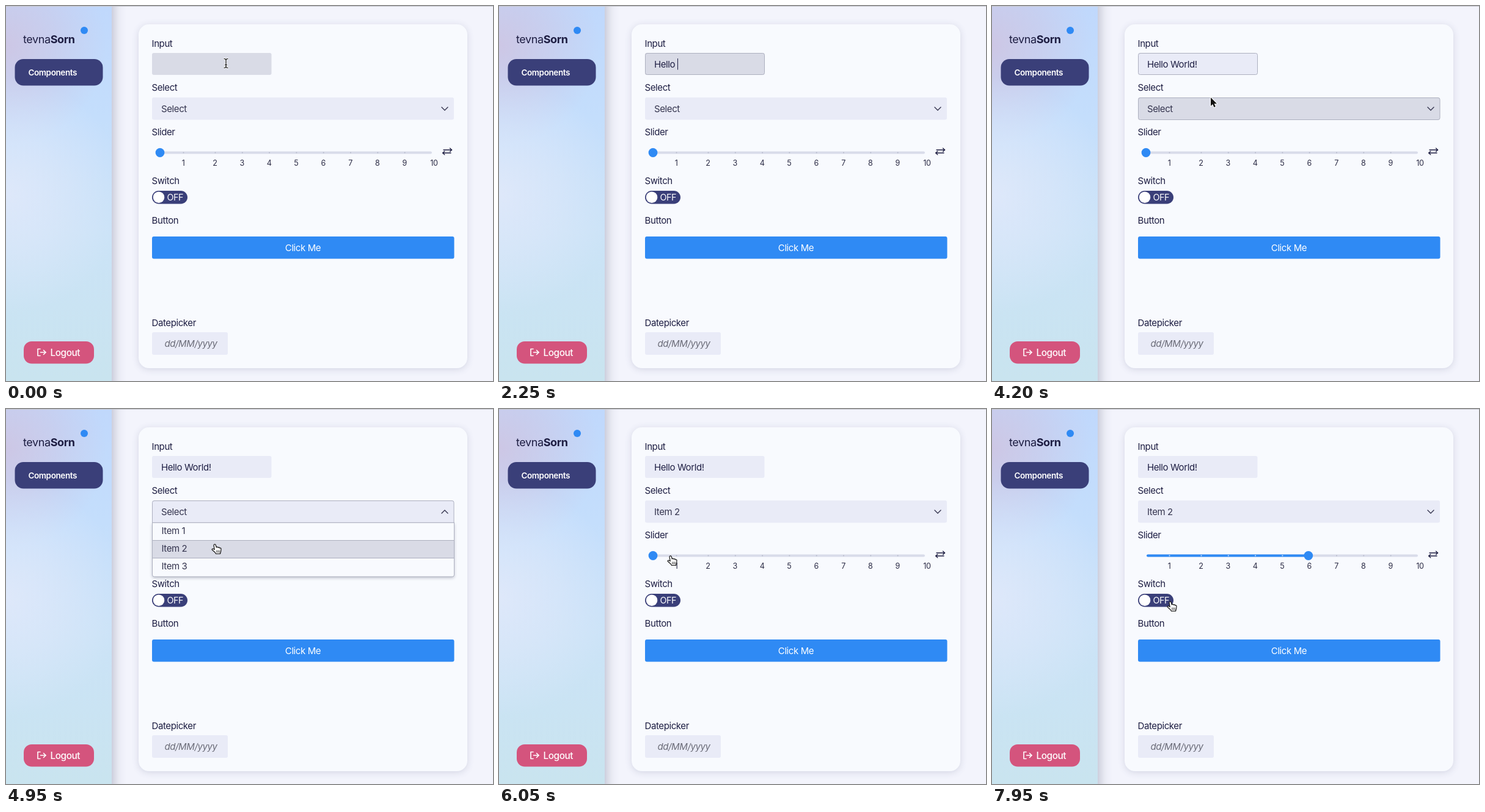
Write an HTML page with a canvas that moves like this. It is 797 px wide and 615 px high and loops after 8000 ms.

```html
<!DOCTYPE html>
<html lang="en">
<head>
<meta charset="utf-8">
<title>Component demo</title>
<style>
html, body { margin: 0; width: 100%; height: 100%; overflow: hidden; background: #f3f4fc; }
canvas { display: block; width: 797px; height: 615px; }
</style>
</head>
<body>
<canvas id="stage"></canvas>
<script>
const W = 797, H = 615, LOOP = 8000, STEP = 50;
const canvas = document.getElementById('stage');
const ctx = canvas.getContext('2d');
const dpr = window.devicePixelRatio || 1;
canvas.width = Math.round(W * dpr);
canvas.height = Math.round(H * dpr);

const INK = '#1d1d42', NAVY = '#3a3f79', BLUE = '#2f8af4', FIELD = '#e9ebf7',
      HOVER = '#d9dbe6', EDGE = '#adb0bf', CARD = '#f8fafe';

const MESSAGE = 'Hello World!';
const KEY_TIMES = [1200, 1400, 1600, 1750, 1950, 2150, 2500, 2650, 2800, 2950, 3050, 3250];
const FOCUS = 600, PRESS = 4150, OPEN = 4250, CHOOSE = 5200, GRAB = 6150;
const WAKE = 3650;

// time, x, y of the pointer's hot spot
const ROUTE = [
  [0, 360, 94], [WAKE, 360, 94], [4050, 358, 150], [4300, 358, 150],
  [4850, 342, 222], [5300, 342, 222], [5900, 281, 241], [GRAB, 281, 241],
  [6700, 509, 244], [7000, 509, 244], [7800, 292, 316], [LOOP, 292, 316]
];

const ARROW = new Path2D('M0 0V14L3.2 11L5.4 16L7.8 15L5.6 10.2H10Z');
const HAND = new Path2D('M-2 1.5C-2-.6.8-.6 1.2 1L2.3 5C3 3.8 5 4 5.2 5.4C6 4.4 7.6 4.8 7.8 6.2' +
  'C8.8 5.4 10 6 10 7.5L9.6 11.5L8.5 15.5H1.5L0 13L-4.6 9C-5.6 7.8-4 6.4-2.6 7.4L-.8 8.6Z');
const KNUCKLES = new Path2D('M2.8 10V13.5M5 10V13.5M7.2 10V13.5');

const ease = p => p * p * (3 - 2 * p);
const within = (p, x, y, w, h) => p.x >= x && p.x <= x + w && p.y >= y && p.y < y + h;

function pointerAt(t) {
  const i = Math.max(1, ROUTE.findIndex(k => k[0] > t));
  const [t0, x0, y0] = ROUTE[i - 1], [t1, x1, y1] = ROUTE[i];
  const p = ease((t - t0) / (t1 - t0));
  return { x: x0 + (x1 - x0) * p, y: y0 + (y1 - y0) * p };
}

function box(x, y, w, h, r, fill, edge) {
  ctx.beginPath();
  ctx.roundRect(x, y, w, h, r);
  if (fill) {
    ctx.fillStyle = fill;
    ctx.fill();
  }
  if (edge) {
    ctx.strokeStyle = edge;
    ctx.lineWidth = 1;
    ctx.stroke();
  }
}

function dot(x, y, r, color) {
  ctx.beginPath();
  ctx.arc(x, y, r, 0, Math.PI * 2);
  ctx.fillStyle = color;
  ctx.fill();
}

function line(color, width, ...points) {
  ctx.beginPath();
  points.forEach(([x, y], i) => i ? ctx.lineTo(x, y) : ctx.moveTo(x, y));
  ctx.strokeStyle = color;
  ctx.lineWidth = width;
  ctx.stroke();
}

function text(str, x, y, { size = 15, weight = 400, color = INK, align = 'left', style = '' } = {}) {
  ctx.font = `${style} ${weight} ${size}px Inter, "Open Sans", sans-serif`;
  ctx.letterSpacing = '-0.4px';
  ctx.textAlign = align;
  ctx.fillStyle = color;
  ctx.fillText(str, x, y);
  return ctx.measureText(str).width;
}

function withShadow(color, blur, dx, dy, draw) {
  ctx.save();
  ctx.shadowColor = color;
  ctx.shadowBlur = blur * dpr;
  ctx.shadowOffsetX = dx * dpr;
  ctx.shadowOffsetY = dy * dpr;
  draw();
  ctx.restore();
}

function glow(x, y, r, rgb) {
  const g = ctx.createRadialGradient(x, y, 0, x, y, r);
  g.addColorStop(0, `rgba(${rgb},1)`);
  g.addColorStop(0.5, `rgba(${rgb},.55)`);
  g.addColorStop(1, `rgba(${rgb},0)`);
  ctx.fillStyle = g;
  ctx.fillRect(0, 0, 173, H);
}

function sidebar() {
  const g = ctx.createLinearGradient(0, 0, 0, H);
  g.addColorStop(0, '#c0d8fc');
  g.addColorStop(0.3, '#c4defc');
  g.addColorStop(0.6, '#cbe3f7');
  g.addColorStop(1, '#c9e4ef');
  withShadow('rgba(70,75,110,.35)', 18, 3, 0, () => box(0, -20, 173, H + 40, 0, '#c9e0f8'));
  ctx.fillStyle = g;
  ctx.fillRect(0, 0, 173, H);
  glow(0, 65, 165, '205,199,229');
  glow(0, 310, 195, '222,232,250');

  const w = text('tevna', 28, 61, { size: 18 });
  text('Sorn', 28 + w, 61, { size: 18, weight: 700 });
  dot(128, 40, 6, BLUE);

  box(14.5, 87, 144, 43.5, 14, NAVY);
  text('Components', 36.5, 113.5, { size: 13.5, weight: 600, color: '#fff' });

  box(29, 550, 115, 36.5, 13, '#d4547d');
  ctx.lineCap = ctx.lineJoin = 'round';
  line('#fff', 1.6, [56, 562.5], [52, 562.5], [52, 573.5], [56, 573.5]);
  line('#fff', 1.6, [56.5, 568], [65, 568]);
  line('#fff', 1.6, [61.5, 564.5], [65, 568], [61.5, 571.5]);
  text('Logout', 72.5, 574, { weight: 500, color: '#fff', size: 15.3 });
}

function inputField(t, mouse) {
  const focused = t >= FOCUS && t < OPEN;
  const hot = within(mouse, 239, 77, 196, 36);
  box(239, 77, 195.5, 36, 3, hot ? HOVER : FIELD);
  if (focused) box(239.5, 77.5, 195, 35, 3, null, EDGE);

  const count = KEY_TIMES.filter(k => k <= t).length;
  const w = text(MESSAGE.slice(0, count), 254, 100.5);
  const lastKey = KEY_TIMES[KEY_TIMES.length - 1];
  const since = t < KEY_TIMES[0] ? t - FOCUS : Math.max(0, t - lastKey);
  if (focused && Math.floor(since / 500) % 2 === 0) {
    ctx.fillStyle = INK;
    ctx.fillRect(Math.round(254 + w), 86, 1, 18.5);
  }
}

function selectField(t, mouse, open) {
  const hot = !open && within(mouse, 239, 149.5, 494, 37);
  const edged = t >= PRESS && t < CHOOSE;
  box(239, 150, 494, 36.5, open ? [3, 3, 0, 0] : 3, hot ? HOVER : FIELD);
  if (edged) box(239.5, 150.5, 493.5, 36, open ? [3, 3, 0, 0] : 3, null, EDGE);
  text(t >= CHOOSE ? 'Item 2' : 'Select', 254, 173.5, { color: '#34344e' });
  const d = open ? -2.5 : 2.5;
  line('#34344e', 1.4, [713, 168.5 - d], [718, 168.5 + d], [723, 168.5 - d]);
}

function slider(mouse, t) {
  const px = t < 6700 ? mouse.x : 509;
  const value = t < GRAB ? 0 : Math.round((px - 252) / 44.3);
  const knob = 252 + value * 44.3;
  box(253, 238.5, 444, 4, 2, '#d9dcea');
  if (value) box(253, 238.5, knob - 253, 4, 2, BLUE);
  for (let n = 1; n <= 10; n++) {
    const x = n === 1 ? 290 : n === 10 ? 700.5 : 253.4 + 44.3 * n;
    if (n < 10) dot(x + 0.5, 240.5, 1, x < knob ? '#cfe3fc' : '#b6bacb');
    text(String(n), x, 262, { size: 12.6, align: 'center', color: '#2b2b45' });
  }
  dot(knob, 240.5, 7.4, BLUE);

  line(INK, 1.4, [716, 236], [729, 236]);
  line(INK, 1.4, [726.5, 233.2], [729.6, 236], [726.5, 238.8]);
  line(INK, 1.4, [715, 241], [728, 241]);
  line(INK, 1.4, [717.8, 238.2], [714.7, 241], [717.8, 243.8]);
}

function dropdown(mouse) {
  withShadow('rgba(40,45,80,.3)', 5, 0, 2, () => box(239.5, 186.5, 494, 88.5, [0, 0, 3, 3], CARD));
  for (let i = 0; i < 3; i++) {
    const y = 186.5 + i * 29.2;
    if (within(mouse, 239, y, 494, 29.2)) box(239.5, y, 494, 29.2, 0, HOVER);
    line(EDGE, 1, [239.5, Math.floor(y) + 0.5], [733.5, Math.floor(y) + 0.5]);
    text('Item ' + (i + 1), 254.5, 204.5 + i * 29.2, { color: '#34344e' });
  }
  box(239.5, 186.5, 494, 88.5, [0, 0, 3, 3], null, EDGE);
}

function card(t, mouse) {
  withShadow('rgba(80,85,130,.2)', 12, 0, 2, () => box(217, 30, 538, 564, 17, CARD));
  [['Input', 66.5], ['Select', 138.5], ['Slider', 212], ['Switch', 291.5],
   ['Button', 357], ['Datepicker', 525]].forEach(([s, y]) => text(s, 238.5, y));

  const open = t >= OPEN && t < CHOOSE;
  inputField(t, mouse);
  selectField(t, mouse, open);
  slider(mouse, t);

  box(239, 303, 58, 21.5, 10.75, NAVY);
  dot(250, 313.7, 9.3, '#fff');
  text('OFF', 263.5, 319, { size: 14.3, color: '#fff' });

  box(239, 378, 494.5, 36.5, 3, BLUE);
  text('Click Me', 486, 402, { color: '#fff', align: 'center' });

  box(239, 535, 124, 37, 3, FIELD);
  text('dd/MM/yyyy', 259.5, 559, { color: '#6b6c78', style: 'italic' });

  if (open) dropdown(mouse);
}

function pointer(t, mouse) {
  if (t >= KEY_TIMES[0] && t <= WAKE) return;
  const open = t >= OPEN && t < CHOOSE;
  const grip = (open && mouse.y > 186) || (t >= GRAB && t < 7000) ||
    (!open && within(mouse, 244, 230, 455, 20)) || within(mouse, 239, 303, 58, 21);
  ctx.save();
  ctx.translate(mouse.x, mouse.y);
  if (grip) {
    ctx.fillStyle = '#fff';
    ctx.fill(HAND);
    ctx.strokeStyle = '#111';
    ctx.lineWidth = 1.2;
    ctx.stroke(HAND);
    ctx.lineWidth = 0.8;
    ctx.stroke(KNUCKLES);
  } else if (within(mouse, 239, 77, 196, 36)) {
    for (const [color, w] of [['#fff', 2.6], ['#111', 1.2]]) {
      line(color, w, [0, -6], [0, 6]);
      line(color, w, [-3, -7.5], [-1.2, -7.2], [0, -6], [1.2, -7.2], [3, -7.5]);
      line(color, w, [-3, 7.5], [-1.2, 7.2], [0, 6], [1.2, 7.2], [3, 7.5]);
      line(color, w, [-1.5, 2.5], [1.5, 2.5]);
    }
  } else {
    ctx.strokeStyle = '#fff';
    ctx.lineWidth = 2;
    ctx.stroke(ARROW);
    ctx.fillStyle = '#111';
    ctx.fill(ARROW);
  }
  ctx.restore();
}

function frame() {
  const t = Math.floor(performance.now() % LOOP / STEP) * STEP;
  const mouse = pointerAt(t);
  ctx.setTransform(dpr, 0, 0, dpr, 0, 0);
  ctx.fillStyle = '#f3f4fc';
  ctx.fillRect(0, 0, W, H);
  sidebar();
  card(t, mouse);
  ctx.fillStyle = '#c6c7ce';
  ctx.fillRect(0, 0, W, 1);
  pointer(t, mouse);
  requestAnimationFrame(frame);
}
frame();
</script>
</body>
</html>
```
